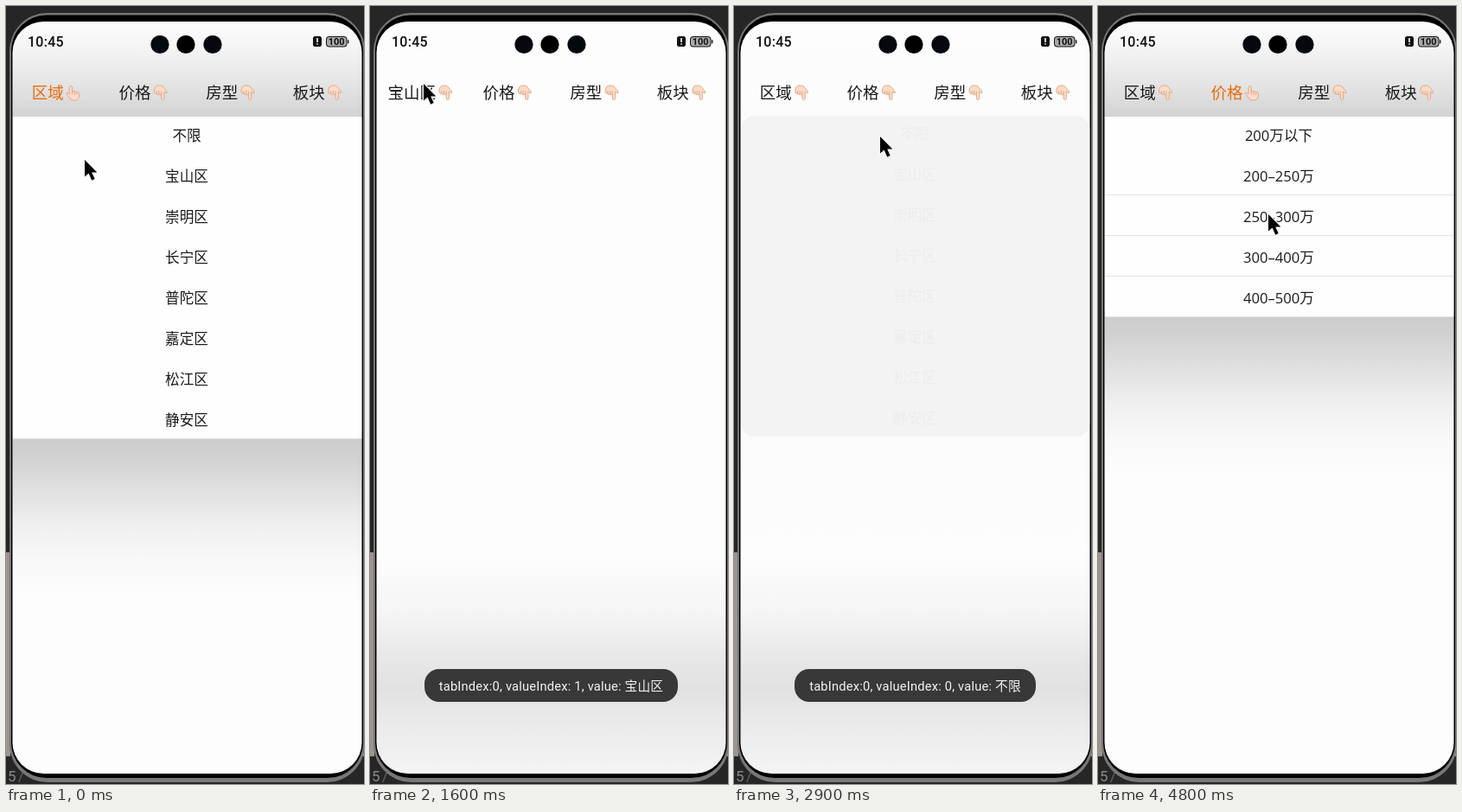
Recreate the animation shown at these times as an HTML page with a canvas. Size 414 by 900 pixels, loop 4.9 s.

```html
<!DOCTYPE html>
<html lang="zh-CN">
<head>
<meta charset="utf-8">
<style>
html, body { margin: 0; width: 100%; height: 100%; overflow: hidden; background: #262626; }
canvas { display: block; width: 414px; height: 900px; }
</style>
</head>
<body>
<canvas id="stage" width="414" height="900"></canvas>
<script>
const ctx = document.getElementById('stage').getContext('2d');
const LOOP = 4900, STEP = 100;
const CJK = '"Noto Sans CJK SC", "Noto Sans CJK JP", sans-serif';
const SANS = '"Open Sans", ' + CJK;
const ROBOTO = 'Roboto, ' + CJK;

const AREAS = ['不限', '宝山区', '崇明区', '长宁区', '普陀区', '嘉定区', '松江区', '静安区'];
const PRICES = ['200万以下', '200–250万', '250–300万', '300–400万', '400–500万'];
const MENUS = [
  { tab: 0, items: AREAS, open: -400, close: 500, lines: false },
  { tab: 0, items: AREAS, open: 1600, close: 2700, lines: true },
  { tab: 1, items: PRICES, open: 3800, close: LOOP, lines: true }
];
const TOASTS = [
  { from: 600, to: 2200, value: '1, value: 宝山区', width: 293 },
  { from: 2800, to: 4500, value: '0, value: 不限', width: 279 }
];

// Menu poses: gray of the sheet, text alpha, shadow, shift, corner radius
const FULL = [254, 1, 1, 0, 0];
const OPENING = [null, [218, .28, .25, -1, 16], [241, 1, 1, 0, 0]];
const CLOSING = [FULL, [198, .45, .4, -2, 16], [243, .03, .05, -2, 16], null];

const CURSOR = [
  [0, 91, 178], [400, 86, 185], [1000, 86, 185], [1400, 62, 90], [2000, 62, 90],
  [2500, 169, 151], [3100, 169, 151], [3600, 161, 102], [4100, 161, 102],
  [4300, 200, 262], [4400, 200, 262], [4800, 197, 241]
];
const ARROW = new Path2D('M0 0V19.5L4.6 15.4L8.2 23.7L11.7 22.1L8.2 14.4H14.4Z');
const HAND = new Path2D('M5 11V3Q6.7 -.5 8.3 3V8Q10 6.5 11 8Q12.8 7 13.7 8.8Q16 8 16.5 10.5V13Q16 17 13 18H8.5Q6.5 17.5 5 15L1.8 11Q1 9 3 9.3Z');
const FOLDS = new Path2D('M8.3 8V11.5M11 8V12M13.7 8.8V12');

function box(x, y, w, h, r, fill) {
  ctx.beginPath();
  ctx.roundRect(x, y, w, h, r);
  ctx.fillStyle = fill;
  ctx.fill();
}

function text(str, x, y, font, fill, align = 'left', spacing = 0) {
  ctx.font = font;
  ctx.fillStyle = fill;
  ctx.textAlign = align;
  ctx.letterSpacing = spacing + 'px';
  ctx.fillText(str, x, y);
}

// Vertical black gradient; stops are [y, alpha]
function shade(stops, strength) {
  const top = stops[0][0], h = stops[stops.length - 1][0] - top;
  const g = ctx.createLinearGradient(0, top, 0, top + h);
  for (const [y, a] of stops) g.addColorStop((y - top) / h, `rgba(0,0,0,${a * strength})`);
  ctx.fillStyle = g;
  ctx.fillRect(0, top, 414, h);
}

function drawPhone() {
  ctx.fillStyle = '#262626';
  ctx.fillRect(0, 0, 414, 900);
  ctx.fillStyle = '#9c948d';
  ctx.fillRect(0, 632, 5, 236);
  ctx.fillRect(411, 632, 3, 236);
  text('5', 2, 897, '17px ' + ROBOTO, '#8b8b8b');
  text('/', 14, 897, '17px ' + ROBOTO, '#666');
  box(4, 8, 411, 890, 44, '#777');
  box(6, 10.5, 407, 882.5, 41, '#000');
  ctx.beginPath();
  ctx.roundRect(7.5, 18, 404, 870, 36);
  ctx.clip();
  ctx.fillStyle = '#fdfdfd';
  ctx.fillRect(0, 0, 414, 900);
}

function drawStatus() {
  text('10:45', 25, 47, '500 16px ' + ROBOTO, '#111', 'left', .25);
  for (const x of [178, 208, 239]) box(x - 10.6, 33.9, 21.2, 21.2, 10.6, x === 208 ? '#000' : '#05080d');
  box(355, 35, 10, 12, 2.5, '#111');
  box(359.2, 37, 1.6, 5, .5, '#fff');
  box(359.2, 43.2, 1.6, 1.6, .5, '#fff');
  box(370, 35, 24.5, 12.5, 4, '#111');
  box(371, 36, 22.5, 10.5, 3, '#aaa');
  box(395, 39, 1.5, 4.5, .7, '#333');
  text('100', 382.2, 45.2, '700 11px ' + ROBOTO, '#111', 'center');
}

function drawHand(x, up) {
  ctx.save();
  ctx.translate(x, 91);
  if (!up) {
    ctx.translate(19, 19);
    ctx.rotate(Math.PI);
  }
  ctx.fillStyle = '#fbdcc8';
  ctx.strokeStyle = '#dd9a78';
  ctx.lineWidth = .8;
  ctx.fill(HAND);
  ctx.stroke(HAND);
  ctx.stroke(FOLDS);
  ctx.restore();
}

function drawTabs(t, active) {
  const first = t >= 600 && t < 2800 ? '宝山区' : '区域';
  [first, '价格', '房型', '板块'].forEach((label, i) => {
    const w = label.length * 18.5, x = 58.5 + 100.7 * i - (w + 20.5) / 2;
    text(label, x, 106.7, '18.5px ' + CJK, i === active ? '#ee6a0a' : '#1a1a1a');
    drawHand(x + w + 1.5, i === active);
  });
}

function menuPose(menu, t) {
  if (t < menu.open) return null;
  if (t >= menu.close) return CLOSING[(t - menu.close) / STEP];
  const step = (t - menu.open) / STEP;
  return step < OPENING.length ? OPENING[step] : FULL;
}

function drawMenuShadow(menu, strength) {
  const end = 124.5 + 47 * menu.items.length;
  shade([[18, 0], [60, .05], [100, .115], [128, .17]], strength);
  shade([[end - 8, .195], [end + 20, .175], [end + 60, .115], [end + 100, .055], [end + 140, .02], [end + 190, 0]], strength);
}

function drawMenu(menu, [gray, alpha, , shift, radius]) {
  const top = shift ? 127 : 128.5;
  const end = 124.5 + 47 * menu.items.length + shift;
  box(8, top, 403.5, end - top, radius, `rgb(${gray},${gray},${gray})`);
  menu.items.forEach((item, i) => {
    const y = 150 + 47 * i + shift;
    text(item, 209, y + 6.1, '16.6px ' + SANS, `rgba(26,26,26,${alpha})`, 'center');
    const ruled = menu.lines && !radius && i % 4 && i < menu.items.length - 1;
    if (ruled) box(8, y + 21, 403.5, 1, 0, 'rgba(0,0,0,.1)');
  });
}

function drawToast(toast, t) {
  if (t < toast.from || t >= toast.to) return;
  const strong = t > toast.from && t < toast.to - STEP;
  shade([[630, 0], [700, .03], [760, .09], [790, .11], [825, .08], [888, .035]], strong ? 1 : .5);
  ctx.globalAlpha = strong ? 1 : .85;
  box(209.5 - toast.width / 2, 767, toast.width, 38, 17, '#383838');
  text('tabIndex:0, valueIndex: ' + toast.value, 209.5, 791.5, '14.7px ' + ROBOTO, '#f4f4f4', 'center', .19);
  ctx.globalAlpha = 1;
}

function drawCursor(t) {
  let i = 0;
  while (i < CURSOR.length - 2 && t >= CURSOR[i + 1][0]) i++;
  const [t0, x0, y0] = CURSOR[i], [t1, x1, y1] = CURSOR[i + 1];
  const p = (t - t0) / (t1 - t0), e = p * p * (3 - 2 * p);
  ctx.save();
  ctx.translate(x0 + (x1 - x0) * e, y0 + (y1 - y0) * e);
  ctx.lineJoin = 'round';
  ctx.lineWidth = 2.4;
  ctx.strokeStyle = '#fff';
  ctx.stroke(ARROW);
  ctx.fillStyle = '#000';
  ctx.fill(ARROW);
  ctx.restore();
}

function draw(now) {
  const t = Math.floor(now % LOOP / STEP) * STEP;
  const menu = MENUS.find(m => menuPose(m, t));
  const pose = menu && menuPose(menu, t);
  ctx.save();
  drawPhone();
  if (menu) drawMenuShadow(menu, pose[2]);
  drawStatus();
  drawTabs(t, menu && t <= menu.close ? menu.tab : -1);
  if (menu) drawMenu(menu, pose);
  for (const toast of TOASTS) drawToast(toast, t);
  drawCursor(t);
  ctx.restore();
}

const start = performance.now();
(function tick() {
  draw(performance.now() - start);
  requestAnimationFrame(tick);
})();
</script>
</body>
</html>
```
